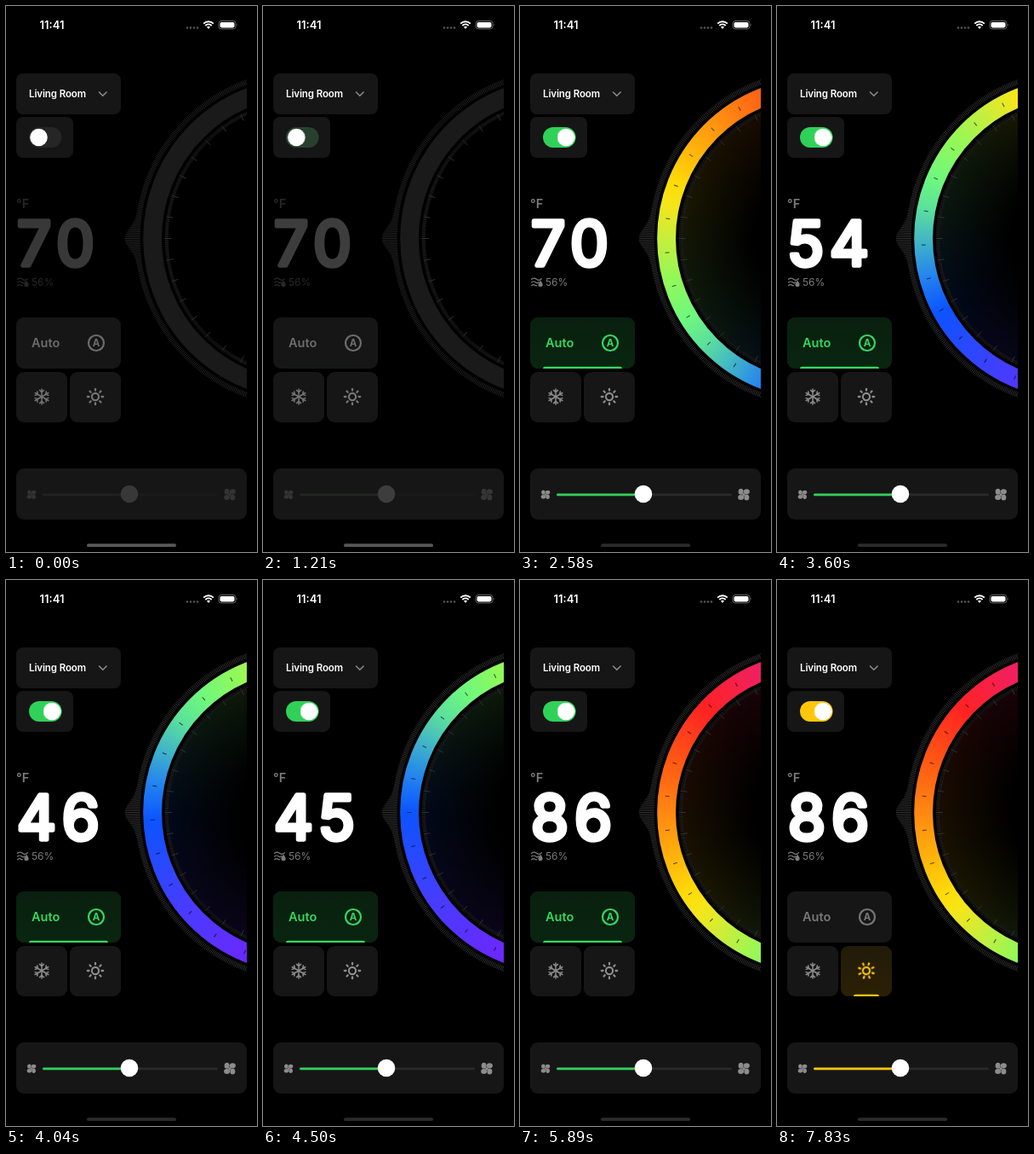
An HTML page with a canvas for the animation above (8000 ms loop, 295 by 640 pixels).

```html
<!DOCTYPE html>
<html lang="en">
<head>
<meta charset="utf-8">
<title>Thermostat</title>
<style>
  html, body { margin: 0; width: 100%; height: 100%; overflow: hidden; background: #000; }
  canvas, svg { position: absolute; left: 0; top: 0; width: 295px; height: 640px; }
  text { font-family: Inter, Roboto, sans-serif; font-weight: 600; }
  .card { fill: #161616; }
  .icon { fill: none; stroke-width: 1.6; stroke-linecap: round; stroke-linejoin: round; }

  .track, .level, .label, .fan, .bright, .thumb, .home, .auto, .autoGlow, .sun, .sunGlow, .spin, .rail, .snow {
    animation: 8s linear infinite;
  }
  .track { animation-name: track; }
  .level { animation-name: level; }
  .label { animation-name: label; }
  .fan { animation-name: fan; }
  .bright { animation-name: bright; }
  .thumb { animation-name: thumb; animation-timing-function: ease-in-out; }
  .home { animation-name: home; }
  .auto { animation-name: auto; }
  .autoGlow { animation-name: autoGlow; }
  .sun { animation-name: sun; }
  .sunGlow { animation-name: sunGlow; }
  .spin { animation-name: spin; animation-timing-function: ease-out; }
  .rail { animation-name: rail; }
  .snow { animation-name: snow; }

  @keyframes track { 0%, 14.5% { fill: #262626 } 18.5%, 90.4% { fill: #30d158 } 95%, 100% { fill: #ffc60a } }
  @keyframes level { 0%, 15% { fill: #222 } 21%, 90.4% { fill: #30d158 } 96%, 100% { fill: #ffc60a } }
  @keyframes label { 0%, 15% { color: #262626 } 21%, 100% { color: #7c7c7c } }
  @keyframes fan { 0%, 15% { color: #333 } 21%, 100% { color: #8c8c8c } }
  @keyframes bright { 0%, 15% { color: #383838 } 21%, 100% { color: #fff } }
  @keyframes thumb { 0%, 14.5% { transform: none } 18.5%, 100% { transform: translateX(15.5px) } }
  @keyframes home { 0%, 15% { fill: #585858 } 21%, 100% { fill: #2b2b2b } }
  @keyframes auto { 0%, 15% { color: #6c6c6c } 21%, 90.4% { color: #36d860 } 96%, 100% { color: #787878 } }
  @keyframes autoGlow { 0%, 15% { opacity: 0 } 21%, 90.4% { opacity: 1 } 96%, 100% { opacity: 0 } }
  @keyframes sun { 0%, 15% { color: #747474 } 21%, 90.4% { color: #8c8c8c } 96%, 100% { color: #ffc60a } }
  @keyframes sunGlow { 0%, 90.4% { opacity: 0 } 97.5%, 100% { opacity: 1 } }
  @keyframes spin { 0%, 90.4% { transform: none } 97.8%, 100% { transform: rotate(20deg) } }
  @keyframes rail { 0%, 15% { fill: #191919 } 21%, 100% { fill: #2a2a2a } }
  @keyframes snow { 0%, 15% { color: #747474 } 21%, 100% { color: #8c8c8c } }
</style>
</head>
<body>
<canvas id="dial"></canvas>
<svg viewBox="0 0 295 640">
  <defs>
    <linearGradient id="green" x2="0" y2="1">
      <stop stop-color="#09200f"/><stop offset="1" stop-color="#092510"/>
    </linearGradient>
    <linearGradient id="amber" x2="0" y2="1">
      <stop stop-color="#221b08"/><stop offset="1" stop-color="#2a2005"/>
    </linearGradient>
    <g id="blades" fill="currentColor">
      <ellipse cx="-2.6" cy="-2.6" rx="2.3" ry="2.7"/><ellipse cx="2.6" cy="-2.6" rx="2.7" ry="2.3"/>
      <ellipse cx="2.6" cy="2.6" rx="2.3" ry="2.7"/><ellipse cx="-2.6" cy="2.6" rx="2.7" ry="2.3"/>
      <circle r="1.3"/>
    </g>
  </defs>

  <!-- status bar -->
  <text x="54" y="27" font-size="13" text-anchor="middle" fill="#fff">11:41</text>
  <g fill="#555">
    <circle cx="213" cy="25.5" r="1.3"/><circle cx="217" cy="25.5" r="1.3"/>
    <circle cx="221" cy="25.5" r="1.3"/><circle cx="225" cy="25.5" r="1.3"/>
  </g>
  <g fill="none" stroke="#fff" stroke-width="1.9">
    <path d="M232.2 20.6a8.4 8.4 0 0 1 11.6 0M234.3 23a5.4 5.4 0 0 1 7.4 0"/>
    <path d="M236 24.6a3 3 0 0 1 4 0L238 27z" fill="#fff" stroke="none"/>
  </g>
  <rect x="250" y="17.5" width="20" height="9.4" rx="3" fill="none" stroke="#666" stroke-width="1"/>
  <rect x="251.5" y="19" width="17" height="6.4" rx="1.8" fill="#fff"/>
  <path d="M271.4 20.6q1.5 1.6 0 3.2z" fill="#666"/>

  <!-- room and power -->
  <rect class="card" x="12" y="79" width="123" height="48" rx="8"/>
  <text x="27" y="107.3" font-size="11.5" letter-spacing="-.1" fill="#fff">Living Room</text>
  <path class="icon" d="M109.5 101l4.3 4.3 4.3-4.3" stroke="#8a8a8a"/>
  <rect class="card" x="12" y="130" width="67" height="48" rx="8"/>
  <rect class="track" x="27" y="142" width="38.5" height="24" rx="12"/>
  <circle class="thumb" cx="38.5" cy="154" r="10.3" fill="#fff"/>

  <!-- reading -->
  <g class="label" fill="currentColor">
    <text x="12" y="237" font-size="14.5">°F</text>
    <text x="30" y="328" font-size="12" style="font-weight:400">56%</text>
    <path class="icon" style="stroke-width:1.2" stroke="currentColor"
      d="M13.5 320.3q3-2.4 6 0t6-.6M13.5 324q2.6-2 5 0t3-.6M13.5 327.7q2.4-2 4.6 0h1.4"/>
    <path d="M24 321.8c1.8 2.4 2.6 3.4 2.6 4.6a2.6 2.6 0 0 1-5.2 0c0-1.2.8-2.2 2.6-4.6z"/>
  </g>
  <g class="bright">
    <text id="value" x="13" y="304.2" font-size="71" letter-spacing="7" fill="currentColor"
      stroke="currentColor" stroke-width="5.4" stroke-linejoin="round" style="font-weight:400">70</text>
  </g>

  <!-- modes -->
  <rect class="card" x="12" y="365" width="123" height="60" rx="9"/>
  <g class="autoGlow">
    <rect x="12" y="365" width="123" height="60" rx="9" fill="url(#green)"/>
    <path d="M27 425q0-2.2 2.4-2.2h88.2q2.4 0 2.4 2.2z" fill="#36d860"/>
  </g>
  <g class="auto" fill="currentColor">
    <text x="30" y="400.3" font-size="14.5">Auto</text>
    <circle cx="106" cy="395" r="9" fill="none" stroke="currentColor" stroke-width="2.2"/>
    <text x="106" y="399" font-size="11.5" text-anchor="middle" style="font-weight:700">A</text>
  </g>
  <rect class="card" x="12" y="429" width="60" height="59" rx="9"/>
  <g class="snow" transform="translate(42 458)">
    <g class="icon" stroke="currentColor" data-copies="6">
      <path d="M0 0V-9M-2.5-7.6L0-5.3 2.5-7.6" stroke-width="1.5"/>
    </g>
  </g>
  <rect class="card" x="75" y="429" width="60" height="59" rx="9"/>
  <g class="sunGlow">
    <rect x="75" y="429" width="60" height="59" rx="9" fill="url(#amber)"/>
    <path d="M90 488q0-2.2 2.4-2.2h25.2q2.4 0 2.4 2.2z" fill="#ffc60a"/>
  </g>
  <g class="sun" transform="translate(105 458)">
    <g class="spin">
      <circle r="4.1" fill="none" stroke="currentColor" stroke-width="2.1"/>
      <g class="icon" stroke="currentColor" data-copies="8"><path d="M0-7.5V-9.2" stroke-width="2.3"/></g>
    </g>
  </g>

  <!-- fan speed -->
  <rect class="card" x="12" y="542" width="271" height="60" rx="9"/>
  <g class="fan">
    <use href="#blades" transform="translate(30 572.7)"/>
    <use href="#blades" transform="translate(263 572.7) scale(1.3)"/>
  </g>
  <rect class="rail" x="43" y="571.6" width="206" height="2.6" rx="1.3"/>
  <rect class="level" x="43" y="571.5" width="102" height="2.8" rx="1.4"/>
  <g class="bright"><circle cx="145" cy="572" r="10.3" fill="currentColor"/></g>
  <rect class="home" x="95" y="630.3" width="105" height="3.8" rx="1.9"/>
</svg>

<script>
const LOOP = 8000, W = 295, H = 640;
const CX = 349.7, CY = 272.5, EDGE_X = 283;
const RING = 177.6, RING_WIDTH = 21.8, TICK_STEP = 360 / 28;
const COLD = -80, DEGREES_PER_F = 3.3;
// Ring colours by dial angle, from cold to hot.
const STOPS = [
  [-80, '#7a20ff'], [-35, '#463cff'], [0, '#0c54ff'], [14, '#2484ee'], [28, '#44b8c4'],
  [40, '#5ce29a'], [52, '#70f87c'], [67, '#92f858'], [80, '#bef042'], [95, '#f4e61c'],
  [103, '#ffdc08'], [120, '#ffae0c'], [136, '#ff8612'], [154, '#ff5a14'], [178, '#ff2222'],
  [202, '#f02060'], [228, '#d020a0'], [280, '#7a20ff']
];

const canvas = document.getElementById('dial');
const valueText = document.getElementById('value');
const scale = Math.max(1, window.devicePixelRatio || 1);
canvas.width = W * scale;
canvas.height = H * scale;
const ctx = canvas.getContext('2d');

for (const group of document.querySelectorAll('[data-copies]')) {
  const part = group.firstElementChild, count = +group.dataset.copies;
  for (let i = 1; i < count; i++) {
    const copy = part.cloneNode();
    copy.setAttribute('transform', `rotate(${360 * i / count})`);
    group.append(copy);
  }
}

const rad = degrees => degrees * Math.PI / 180;
const clamp = x => Math.min(1, Math.max(0, x));
const easeOut = (t, start, end, power) => 1 - (1 - clamp((t - start) / (end - start))) ** power;
// Angle 0 is the leftmost point of the dial; positive angles go down.
const point = (angle, r) => [CX - r * Math.cos(rad(angle)), CY + r * Math.sin(rad(angle))];

function temperature(t) {
  return t < 5110 ? 70 - 25 * easeOut(t, 3270, 4500, 3.43) : 45 + 41 * easeOut(t, 5110, 5890, 1.98);
}

function spokes(from, to, step, inner, outer, color, width) {
  ctx.beginPath();
  for (let a = from; a <= to; a += step) {
    ctx.moveTo(...point(a, inner));
    ctx.lineTo(...point(a, typeof outer === 'function' ? outer(a) : outer));
  }
  ctx.strokeStyle = color;
  ctx.lineWidth = width;
  ctx.stroke();
}

function arc(from, to, color) {
  ctx.beginPath();
  ctx.arc(CX, CY, RING, rad(180 - from), rad(180 - to));
  ctx.strokeStyle = color;
  ctx.lineWidth = RING_WIDTH;
  ctx.stroke();
}

function disc(x, y, r, fill) {
  ctx.beginPath();
  ctx.arc(x, y, r, 0, 2 * Math.PI);
  ctx.fillStyle = fill;
  ctx.fill();
}

function drawGlow(spectrum, strength) {
  if (!strength) return;
  ctx.globalAlpha = 0.11 * strength;
  disc(CX, CY, 160, spectrum);
  ctx.globalAlpha = 1;
  const shade = ctx.createRadialGradient(CX, CY, 75, CX, CY, 161);
  shade.addColorStop(0, '#000');
  shade.addColorStop(1, 'rgba(0,0,0,0.1)');
  disc(CX, CY, 161, shade);
}

// Bubbles swell as the filled edge comes near, scattered by golden-ratio steps.
function drawBubbles(edge, spectrum) {
  for (let i = 0; i < 130; i++) {
    const angle = 80 - 1.35 * i, ahead = edge - angle;
    if (ahead < -2 || ahead > 27) continue;
    const near = 1 - (Math.max(0, ahead) / 27) ** 1.2;
    const size = 5.2 * near * (0.7 + 0.3 * (i * 0.371 % 1));
    disc(...point(angle, 170 + 15.5 * (i * 0.618 % 1)), size, spectrum);
  }
}

function drawDial(t) {
  const turn = DEGREES_PER_F * (temperature(t) - 45);
  const lit = clamp((t - 1200) / 480);
  const edge = 80 - 172 * easeOut(t, 1300, 2600, 1.25);
  const spectrum = ctx.createConicGradient(rad(180 - turn + COLD), CX, CY);
  for (const [angle, color] of STOPS) spectrum.addColorStop((angle - COLD) / 360, color);

  ctx.setTransform(scale, 0, 0, scale, 0, 0);
  ctx.clearRect(0, 0, W, H);
  ctx.save();
  ctx.beginPath();
  ctx.rect(0, 0, EDGE_X, H);
  ctx.clip();

  drawGlow(spectrum, clamp((t - 1950) / 550));
  const grey = 42 + 14 * lit;
  const bulge = a => 198 + 12 * Math.exp(-((a / 4.5) ** 2));
  spokes(-75, 75, 0.6, 192, bulge, `rgb(${grey},${grey},${grey})`, 0.9);
  spokes(-72, 72, 0.6, 159, 163, '#2a2a2a', 0.8);
  spokes(-72, 72, 9, 155, 163, '#363636', 0.9);
  arc(90, -90, '#1a1a1a');

  if (t > 1300) {
    arc(90, edge, spectrum);
    drawBubbles(edge, spectrum);
    const last = Math.floor((90 - turn) / TICK_STEP);
    const first = Math.ceil((edge - turn) / TICK_STEP);
    spokes(turn + first * TICK_STEP, turn + last * TICK_STEP + 0.01, TICK_STEP, 175, 180, 'rgba(0,0,0,0.62)', 1.1);
  }
  ctx.restore();
}

function frame() {
  const t = performance.now() % LOOP;
  drawDial(t);
  const value = String(Math.round(temperature(t)));
  if (valueText.textContent !== value) valueText.textContent = value;
  requestAnimationFrame(frame);
}
frame();
</script>
</body>
</html>
```
